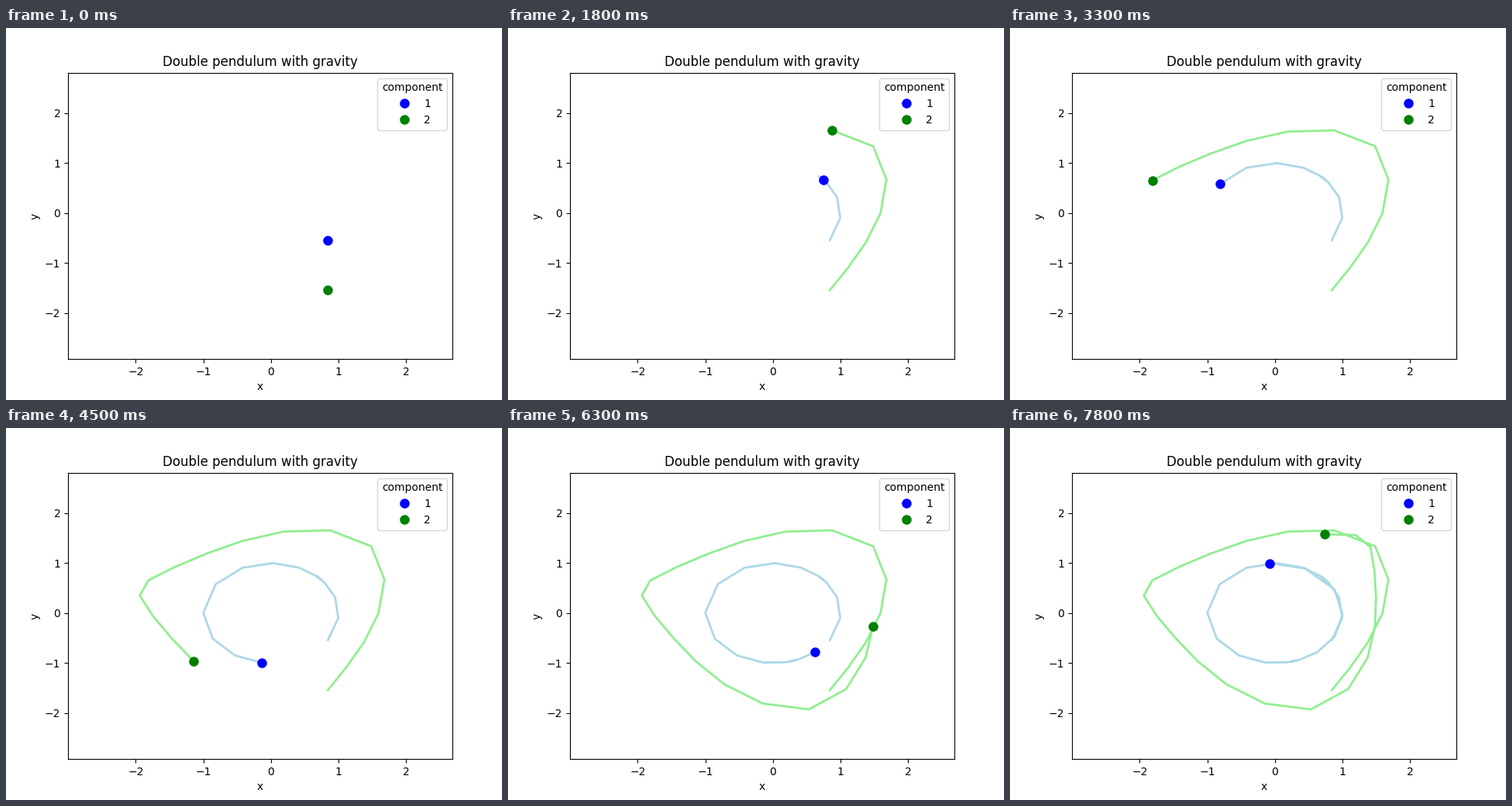
Animation of 640x480 px, one loop 8 s. Source, as a matplotlib script:

```python
import numpy as np
import matplotlib.pyplot as plt
from matplotlib.animation import FuncAnimation

FRAME_MS = 100
FRAMES_PER_STEP = 3
N_FRAMES = 80
N_STEPS = (N_FRAMES - 1) // FRAMES_PER_STEP + 1
SUBSTEPS = 40


def derivative(state):
    """Free motion of two equal masses on unit arms."""
    angle1, angle2, rate1, rate2 = state
    s, c = np.sin(angle1 - angle2), np.cos(angle1 - angle2)
    accel1 = -s * (rate2**2 + c * rate1**2) / (2 - c**2)
    accel2 = s * rate1**2 - c * accel1
    return np.array([rate1, rate2, accel1, accel2])


def advance(state, dt):
    """One Runge-Kutta step."""
    k1 = derivative(state)
    k2 = derivative(state + dt / 2 * k1)
    k3 = derivative(state + dt / 2 * k2)
    k4 = derivative(state + dt * k3)
    return state + dt / 6 * (k1 + 2 * k2 + 2 * k3 + k4)


def simulate():
    state = np.array([1.0, 0.0, 0.5, 0.0])
    angles = []
    for _ in range(N_STEPS):
        angles.append(state[:2])
        for _ in range(SUBSTEPS):
            state = advance(state, 1 / SUBSTEPS)
    return np.array(angles).T


def arm(angle):
    """Arm vectors for angles measured from straight down."""
    return np.column_stack([np.sin(angle), -np.cos(angle)])


inner, outer = map(arm, simulate())
paths = [inner, inner + outer]

fig, ax = plt.subplots(figsize=(6.4, 4.8), dpi=100)
ax.set(xlim=(-2.9997, 2.6824), ylim=(-2.92, 2.81),
       xticks=range(-2, 3), yticks=range(-2, 3),
       xlabel="x", ylabel="y", title="Double pendulum with gravity")

trails = [ax.plot([], [], color=color, lw=2, zorder=2)[0]
          for color in ("lightblue", "lightgreen")]
bobs = [ax.plot([], [], "o", color=color, ms=8, zorder=3, label=label)[0]
        for color, label in (("blue", "1"), ("green", "2"))]
ax.legend(handles=bobs, title="component", loc="upper right")


def update(frame):
    step = frame // FRAMES_PER_STEP
    for path, trail, bob in zip(paths, trails, bobs):
        trail.set_data(*path[:step + 1].T)
        bob.set_data(*path[step:step + 1].T)
    return trails + bobs


anim = FuncAnimation(fig, update, frames=N_FRAMES, interval=FRAME_MS,
                     repeat=True, repeat_delay=0, blit=False)
plt.show()
```
